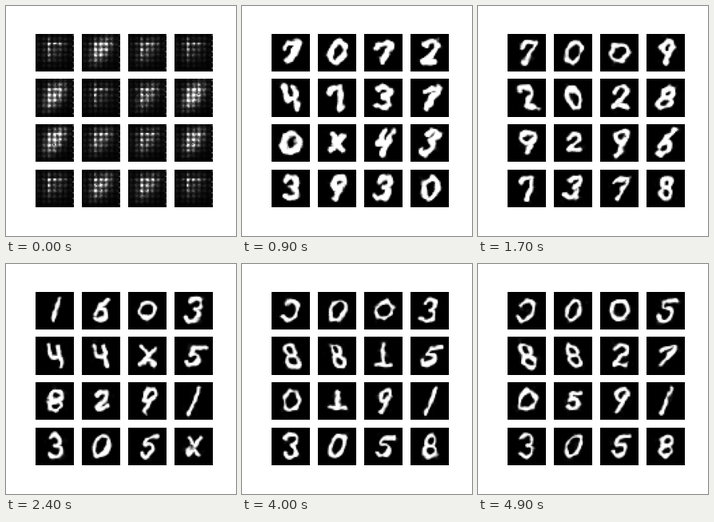
These frames come from a looping animation (288x288 px, 5.1 s). A matplotlib script:

```python
import matplotlib.pyplot as plt
import numpy as np
from matplotlib.animation import FuncAnimation

FRAMES, LAST = 51, 49
KEYS = np.array([9, 17, 24, 32, 40, 49])
SIZE, SPAN, SAMPLES = 28, 47.3, 60

axis = (np.arange(SIZE) + 0.5) * SPAN / SIZE
GX, GY = np.meshgrid(axis, axis)


def arc(cx, cy, rx, ry, start, end):
    a = np.radians(np.linspace(start, end, 24))
    return np.column_stack([cx + rx * np.cos(a), cy + ry * np.sin(a)])


def line(*points):
    return np.array(points, float)


# Glyphs as single pen strokes in a unit box, y pointing down.
GLYPHS = {
    "0": [arc(0, 0, 0.95, 0.95, -70, 290)],
    "1": [line((0, -1), (0.1, 0), (0, 1))],
    "2": [arc(0, -0.5, 0.8, 0.5, 190, 390), line((-0.7, 0.85), (0.9, 0.8))],
    "3": [arc(-0.1, -0.5, 0.8, 0.5, 200, 440), arc(-0.1, 0.45, 0.9, 0.5, -90, 150)],
    "4": [line((-0.6, -0.9), (-0.8, 0.1), (0.6, 0), (0.8, -1), (0.5, 0.1), (0.4, 1))],
    "5": [line((1, -0.9), (-0.5, -0.75), (-0.6, -0.1)), arc(0, 0.4, 0.8, 0.55, -90, 160)],
    "6": [line((0.4, -1), (-0.6, 0)), arc(0, 0.45, 0.8, 0.5, 180, 500)],
    "7": [line((-1, -0.5), (-0.6, -0.85), (0.8, -0.95), (0.7, -0.4), (-0.1, 1))],
    "8": [arc(0, -0.45, 0.75, 0.5, 90, 450), arc(0, 0.5, 0.85, 0.5, -90, 270)],
    "9": [arc(0, -0.45, 0.8, 0.5, 0, -330), line((0.6, -0.4), (0.4, 0.2), (0.2, 1))],
    ")": [arc(-0.15, 0, 1, 0.95, -150, 140)],
    "x": [line((-0.8, -0.9), (0, 0), (0.9, -0.8), (-0.9, 0.9), (0, 0.3), (0.9, 0.9))],
    "L": [line((-0.1, -1), (-0.1, 0), (0.2, 0.75), (-1, 0.9), (1, 0.85))],
}

# Glyph at each key time, half width, half height, slant, first-frame glow.
CELLS = [
    ("771)))", 9, 13, 0.25, 0.12), ("006000", 9, 13, 0.25, 0.75),
    ("700000", 11, 11, 0.1, 0.25), ("293035", 9, 14, 0.25, 0.08),
    ("424888", 9, 14, -0.3, 0.85), ("704888", 8, 13, -0.3, 0.1),
    ("32xLL2", 10, 13, 0.1, 0.5), ("785757", 9, 12, 0.4, 0.95),
    ("098000", 10, 12, 0.1, 0.85), ("x22LL5", 8, 11, 0.1, 0.4),
    ("499999", 8, 15, 0.35, 0.35), ("361111", 7, 15, 0.45, 0.65),
    ("373233", 8, 14, 0, 0.15), ("930000", 9, 13, 0.35, 0.6),
    ("375555", 9, 13, 0.25, 0.45), ("08x888", 9, 13, 0.1, 0.12),
]


def resample(points):
    """Smooth path of SAMPLES evenly spaced points."""
    length = np.r_[0, np.cumsum(np.hypot(*np.diff(points, axis=0).T))]
    s = np.linspace(0, length[-1], SAMPLES)
    path = np.column_stack([np.interp(s, length, c) for c in points.T])
    for _ in range(4):
        path[1:-1] = path[:-2] / 4 + path[1:-1] / 2 + path[2:] / 4
    return path


PATHS = {name: resample(np.vstack(parts)) for name, parts in GLYPHS.items()}


def blob_noise(rng, passes=2):
    """Smooth random field of unit spread."""
    field = rng.normal(size=(SIZE, SIZE))
    for ax in (0, 1):
        for _ in range(passes):
            field = (np.roll(field, 1, ax) + field + np.roll(field, -1, ax)) / 3
    return field / field.std()


def lattice(glow, rng):
    """Untrained output: a regular dot lattice under a slanted glow."""
    i, j = np.meshgrid(np.arange(SIZE), np.arange(SIZE))
    across, along = GX - 24 + 0.45 * (GY - 21), GY - 21
    patch = np.exp(-(across / 9) ** 2 - (along / 14) ** 2)
    bar_x, bar_y = np.isin(i % 4, (1, 2)), np.isin(j % 4, (3, 0))
    texture = 0.3 + 0.3 * bar_x + 0.25 * bar_y + 0.35 * (bar_x & bar_y)
    column = np.exp(-((GX - 16.5) / 1.3) ** 2 - ((GY - 18) / 11) ** 2)
    row = np.exp(-((GY - 13) / 1.3) ** 2 - ((GX - 24) / 11) ** 2)
    dots = (column + row) * np.where(bar_x & bar_y, 0.8, 0.25)
    haze = 0.16 * texture * np.exp(-((GX - 22) / 22) ** 2 - ((GY - 20) / 19) ** 2)
    edge = 0.3 * ((i == SIZE - 1) & (j % 4 == 1))
    grain = 1 + 0.22 * rng.normal(size=(SIZE, SIZE))
    return (1.05 * glow * patch * texture + dots + haze + edge) * grain


def stroke(cell, frame, early):
    """Pen path in pixels, morphing from one glyph to the next."""
    word, rx, ry, slant, _ = CELLS[cell]
    pose = np.interp(frame, KEYS, range(len(KEYS)))
    k = min(int(pose), len(KEYS) - 2)
    a, b = PATHS[word[k]], PATHS[word[k + 1]]
    x, y = (a + (b - a) * (pose - k)).T
    scale = 1 - 0.3 * early
    return 24.5 + scale * (rx * x - slant * ry * y), 23.5 + scale * ry * y


def picture(cell, frame):
    rng = np.random.default_rng(1000 * cell + frame)
    glow = CELLS[cell][-1]
    if frame == 0:
        return np.clip(lattice(glow, rng), 0, 1)
    early = max(0, 1 - frame / KEYS[0])
    x, y = stroke(cell, frame, early)
    # Bend the plane slightly so that strokes look uneven.
    bend = 0.7 + 1.5 * early
    px = GX + bend * blob_noise(rng, 4)
    py = GY + bend * blob_noise(rng, 4)
    dist = np.hypot(px[..., None] - x, py[..., None] - y).min(-1)
    width = 2.3 + 1.3 * np.exp(-(frame - KEYS[0]) / 9)
    noise = blob_noise(rng)
    ink = np.clip((width * (1 + 0.22 * noise) - dist) / (2.6 + 6 * early) + 0.5, 0, 1)
    smudge = 0.12 * np.clip(noise - 0.8, 0, 2) * np.exp(-(dist / 6) ** 2)
    value = np.maximum(ink * ink * (3 - 2 * ink), smudge)
    if frame < 4:
        mix = (4 - frame) / 6
        value = (1 - mix) * value + mix * lattice(glow, rng)
    return np.clip(value, 0, 1)


fig, axes = plt.subplots(4, 4, figsize=(4, 4), dpi=72, facecolor="white")
fig.subplots_adjust(left=0.125, right=0.9, bottom=0.125, top=0.88)
images = []
for ax in axes.flat:
    ax.axis("off")
    images.append(ax.imshow(np.zeros((SIZE, SIZE)), cmap="gray", vmin=0, vmax=1))


def update(frame):
    for cell, image in enumerate(images):
        image.set_data(picture(cell, min(frame, LAST)))
    return images


animation = FuncAnimation(fig, update, frames=FRAMES, interval=100,
                          repeat=True, repeat_delay=0)
plt.show()
```
